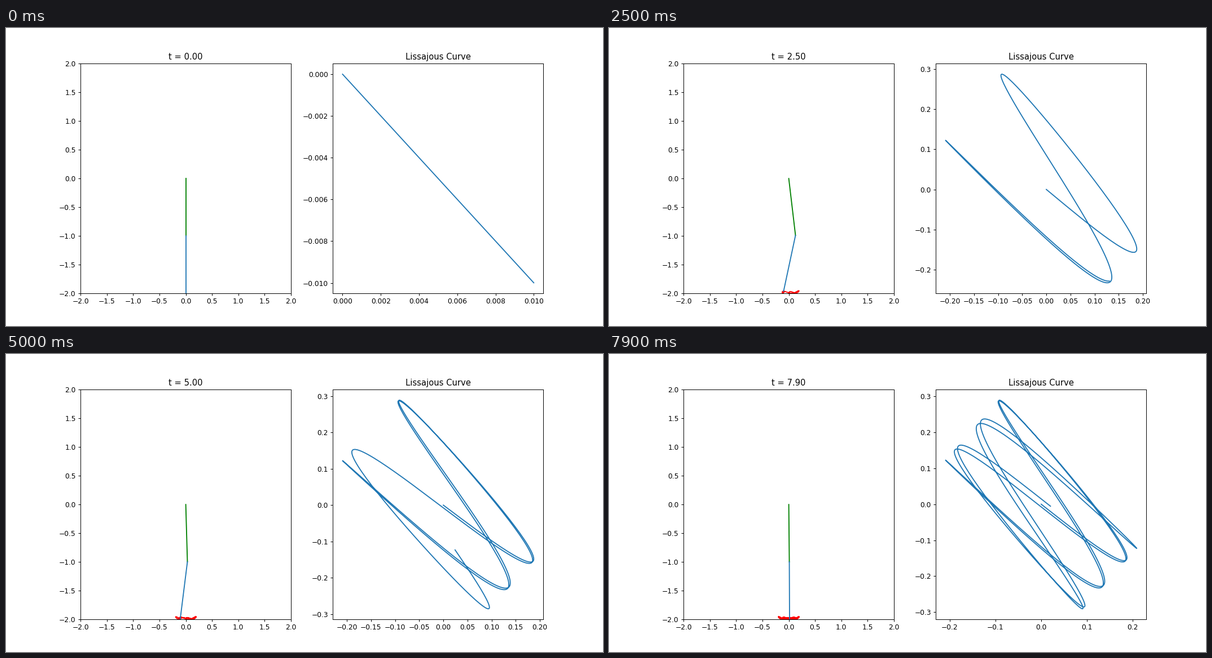
Write a matplotlib script that moves like this. It is 1058x529 px and loops after 8 s.

```python
import numpy as np
import matplotlib.pyplot as plt
from matplotlib.animation import FuncAnimation

WIDTH_PX = 1058
SIZE = (12, 6)  # inches, giving a stage of 1058 by 529 pixels
FRAMES, INTERVAL = 80, 100
G = 9.81
DT = 0.01
STRIDE = 10    # samples per frame
SUBSTEPS = 4   # integration steps per sample


def deriv(state):
    """Double pendulum with unit rods and equal masses."""
    a, b, va, vb = state
    s, c = np.sin(a - b), np.cos(a - b)
    pull = va**2 * s - G * np.sin(b)
    acc_a = (-vb**2 * s - 2 * G * np.sin(a) - c * pull) / (2 - c**2)
    return np.array([va, vb, acc_a, pull - c * acc_a])


def rk4(state, h):
    k1 = deriv(state)
    k2 = deriv(state + h / 2 * k1)
    k3 = deriv(state + h / 2 * k2)
    k4 = deriv(state + h * k3)
    return state + h / 6 * (k1 + 2 * k2 + 2 * k3 + k4)


def simulate(count):
    state = np.array([0.0, 0.0, 1.0, -1.0])
    angles = [state[:2]]
    for _ in range(count - 1):
        for _ in range(SUBSTEPS):
            state = rk4(state, DT / SUBSTEPS)
        angles.append(state[:2])
    return np.array(angles).T


phi1, phi2 = simulate(FRAMES * STRIDE + 2)
x1, y1 = np.sin(phi1), -np.cos(phi1)
x2, y2 = x1 + np.sin(phi2), y1 - np.cos(phi2)

fig, (ax_rods, ax_curve) = plt.subplots(1, 2, figsize=SIZE, dpi=WIDTH_PX / SIZE[0])

trail, = ax_rods.plot([], [], color="red")
upper, = ax_rods.plot([], [], color="green")
lower, = ax_rods.plot([], [], color="C0")
ax_rods.set_xlim(-2, 2)
ax_rods.set_ylim(-2, 2)
title = ax_rods.set_title("t = 0.00")

curve, = ax_curve.plot([], [], color="C0")
ax_curve.set_title("Lissajous Curve")


def update(frame):
    i = frame * STRIDE
    upper.set_data([0, x1[i]], [0, y1[i]])
    lower.set_data([x1[i], x2[i]], [y1[i], y2[i]])
    trail.set_data(x2[:i + 1], y2[:i + 1])
    title.set_text(f"t = {i * DT:.2f}")

    # the curve runs one sample ahead of the rods
    curve.set_data(phi1[:i + 2], phi2[:i + 2])
    ax_curve.relim()
    ax_curve.autoscale_view()
    return trail, upper, lower, title, curve


anim = FuncAnimation(fig, update, frames=FRAMES, interval=INTERVAL,
                     repeat=True, repeat_delay=0, blit=False)
plt.show()
```
